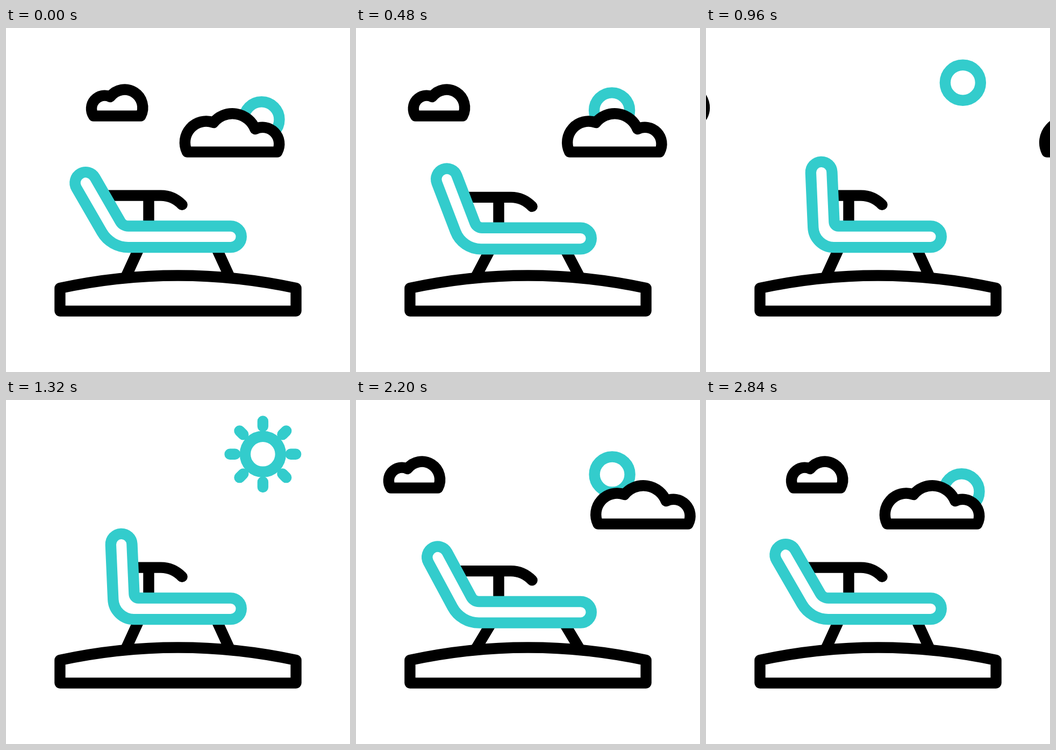
Recreate the animation shown at these times as an HTML page with a canvas. Size 640x640 px, loop 3000 ms.

```html
<!DOCTYPE html>
<html lang="en">
<head>
<meta charset="utf-8">
<title>Sun lounger</title>
<style>
  html, body { margin: 0; width: 100%; height: 100%; overflow: hidden; background: #fff; }
  canvas { display: block; width: 100%; height: 100%; }
</style>
</head>
<body>
<canvas id="stage" width="640" height="640"></canvas>
<script>
const ctx = document.getElementById('stage').getContext('2d');
const LOOP = 3000, STEP = 40, LAST = 2840;
const BLACK = '#000', TEAL = '#33cccc';

const bigCloud = new Path2D('M337 230.6A39.5 39.5 0 0 1 386 176A45.5 45.5 0 0 1 463.5 188A31 31 0 0 1 504.5 230.6Z');
const smallCloud = new Path2D('M163 163.6A24.5 24.5 0 0 1 194 128A33.5 33.5 0 0 1 250.5 163.6Z');
const ground = new Path2D('M100.4 484Q320 437 539.6 484V526.6H100.4Z');
const armrest = new Path2D('M188 311.6H288C303 311.6 317 318 327.6 328.8M265.5 311.6V368');

// Symmetric cubic Bezier ease with handles at 0.4 and 0.6, solved by bisection.
function ease(u) {
  if (u <= 0) return 0;
  if (u >= 1) return 1;
  let low = 0, high = 1, s;
  for (let i = 0; i < 24; i++) {
    s = (low + high) / 2;
    const x = 1.2 * s * (1 - s) ** 2 + 1.8 * s * s * (1 - s) + s ** 3;
    if (x < u) low = s; else high = s;
  }
  return s * s * (3 - 2 * s);
}

// Goes 0 -> 1 during [a, b] and back to 0 during [c, d].
const there = (t, a, b, c, d) => ease((t - a) / (b - a)) - ease((t - c) / (d - c));

function draw(path, color, fill) {
  ctx.strokeStyle = color;
  if (fill) {
    ctx.fillStyle = '#fff';
    ctx.fill(path);
  }
  ctx.stroke(path);
}

function shifted(dx, dy, paint) {
  ctx.save();
  ctx.translate(dx, dy);
  paint();
  ctx.restore();
}

function drawSun(t) {
  const rise = there(t, 203, 1025, 1809, 2553);
  const rays = there(t, 1000, 1400, 1860, 2140);
  shifted(475.5 + 2.4 * rise, 170.3 - 69.5 * rise, () => {
    if (rays > 0) {
      const tip = 30 + 34.3 * rays;
      const sticks = new Path2D();
      for (let i = 0; i < 8; i++) {
        const x = Math.cos(i * Math.PI / 4), y = Math.sin(i * Math.PI / 4);
        sticks.moveTo(x * (tip - 9.6), y * (tip - 9.6));
        sticks.lineTo(x * tip, y * tip);
      }
      draw(sticks, TEAL);
    }
    const disc = new Path2D();
    disc.arc(0, 0, 33, 0, 2 * Math.PI);
    draw(disc, TEAL, true);
  });
}

// Outline of the cushion; tilt is the backrest's angle from vertical.
function cushion(tilt) {
  const right = 418, top = 368.5, bottom = 408.1, r = 19.8;
  const sin = Math.sin(tilt), cos = Math.cos(tilt), degrees = tilt * 180 / Math.PI;
  const headX = 221 - 145.5 * sin, headY = 414 - 145.5 * cos;
  const leftX = headX - r * cos, leftY = headY + r * sin;
  const rightX = headX + r * cos, rightY = headY - r * sin;
  const path = new Path2D();
  path.arc(right, (top + bottom) / 2, r, -Math.PI / 2, Math.PI / 2);
  path.arcTo(leftX + (bottom - leftY) * sin / cos, bottom, leftX, leftY, 37 + 0.66 * degrees);
  path.arc(headX, headY, r, Math.PI - tilt, 2 * Math.PI - tilt);
  path.arcTo(rightX + (top - rightY) * sin / cos, top, right, top, 7 + 0.33 * degrees);
  path.closePath();
  return path;
}

function drawLounger(t) {
  const sink = 6.5 * (there(t, 0, 320, 320, 640) + there(t, 1880, 2200, 2200, 2520));
  const tilt = (30 - 27.5 * there(t, 280, 786, 1773, 2287)) * Math.PI / 180;
  const legs = new Path2D();
  for (const side of [-1, 1]) {
    legs.moveTo(319.5 + side * 96.5, 463);
    legs.lineTo(319.5 + side * (71.3 - 0.6 * sink), 408 + sink);
  }
  ctx.lineCap = 'butt';
  draw(legs, BLACK);
  ctx.lineCap = 'round';
  draw(ground, BLACK, true);
  shifted(0, sink, () => {
    ctx.save();
    ctx.beginPath();
    ctx.rect(188, 280, 200, 100);
    ctx.clip();
    draw(armrest, BLACK);
    ctx.restore();
    draw(cushion(tilt), TEAL, true);
  });
}

function render(now) {
  const t = Math.min(Math.floor(now % LOOP / STEP) * STEP, LAST);
  ctx.clearRect(0, 0, 640, 640);
  ctx.lineWidth = 20.4;
  ctx.lineCap = ctx.lineJoin = 'round';
  drawSun(t);
  const drift = 328 * there(t, 200, 1160, 1555, 2640);
  shifted(drift, 0, () => draw(bigCloud, BLACK, true));
  shifted(-0.866 * drift, 0, () => draw(smallCloud, BLACK, true));
  drawLounger(t);
}

let start;
function tick(now) {
  start ??= now;
  render(now - start);
  requestAnimationFrame(tick);
}
render(0);
requestAnimationFrame(tick);
</script>
</body>
</html>
```
